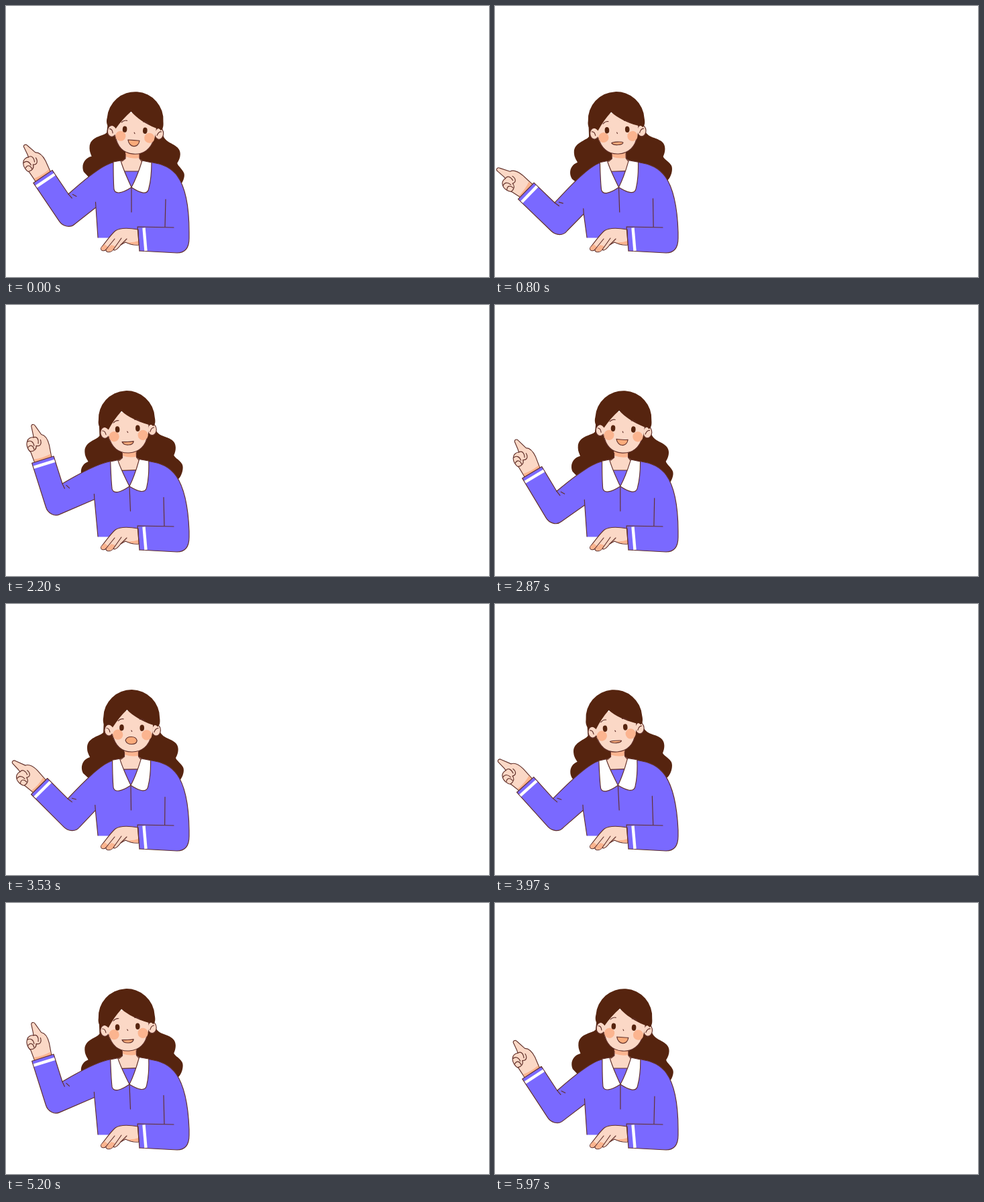
An HTML page for the animation above (6010 ms loop, 720 px wide and 405 px high).

```html
<!DOCTYPE html>
<html lang="en">
<head>
<meta charset="utf-8">
<title>Pointing presenter</title>
<style>
  html, body { margin: 0; width: 100%; height: 100%; overflow: hidden; background: #fff; }
  svg { display: block; width: 100vw; height: 100vh; }
  .hair { fill: #56240f; }
  .skin { fill: #fbd8c6; }
  .blush { fill: #fbb48f; }
  .cloth { fill: #7a69ff; }
  .white { fill: #fff; }
  .line { stroke: #61302a; stroke-width: 1.15; stroke-linecap: round; stroke-linejoin: round; }
  .open { fill: none; }
  .stripe { fill: none; stroke: #fff; stroke-width: 4.4; }
</style>
</head>
<body>
<svg viewBox="0 0 720 405">
  <g id="backHair">
    <path class="hair" d="M-40-80L-41-58C-46-52-66-51-65-34C-65-28-62-24-61-21C-72-18-76-6-71 3L-58 15L68 18C76 14 81 0 78-6C75-12 68-16 67-20C71-27 73-37 66-43C58-50 48-49 43-60L40-80Z"/>
  </g>

  <g id="hand">
    <path class="skin line" d="M-30-40V-60C-33-64-33-73-29-77C-27-80-22-81-18.500-79L-17.500-83L-15.800-95C-15.500-98.500-10.500-98.500-10-94L-6-79C-1-76 .5-69-.5-60L-4-40Z"/>
    <path class="blush" d="M-29.400-40V-48Q-16-45-3.300-47L-4.500-40Z"/>
    <path class="line open" d="M-29-76C-24-77-21-73-22-67M-18.500-79C-13-79-12-74-15-68M-31-68C-26-71-23-67-24-62M-30-61C-25-59-20-61-19-66C-14-62-10-66-10-72"/>
  </g>

  <path id="body" class="cloth"/>
  <path id="outline" class="line open"/>
  <g id="forearm">
    <path class="stripe" d="M-33.400-36H-.6"/>
    <path class="line open" d="M0 0L1 8M5 4L8 9.500"/>
  </g>

  <g id="chest">
    <path class="skin" d="M-9-58V-43L-17-38L-10-24H11L18-38L12-43V-58Z"/>
    <path class="blush" d="M-9-52H12V-44Q2-42-9-46Z"/>
    <path class="line open" d="M-9-50V-43L-14-39M12-50V-43L15-39M-10-24H11"/>
    <path class="white line" d="M-16-40L-27-38C-27-20-27-8-26 3C-24 11-14 9 0 0C-6-13-12-26-16-40Z"/>
    <path class="white line" d="M16-40L30-37C30-20 28-6 25.500 3C23 12 12 8 0 0C7-13 12-27 16-40Z"/>
  </g>

  <path class="skin line" d="M197 334C185 332 170 331 163 336C157 341 150 351 142 361C140 366 146 367 149 364C149 369 156 369 160 364C163 367 168 361 171 357L178 353C184 356 190 358 198 357Z"/>
  <path class="blush" d="M147 356L142 361C141 366 146 366 149 363C150 368 156 368 160 364L163 359L157 357L153 361Z"/>
  <path class="blush" d="M180 353Q189 354 197.500 351V356.500Q188 357 180 353Z"/>
  <path class="line open" d="M162 348L149 364M172 347L160 364M180 348L171 357"/>
  <path class="stripe" d="M205.500 331.500L208.500 366"/>
  <path class="line open" d="M250 331L196 330L199 366"/>

  <g id="head">
    <g class="skin line">
      <ellipse cx="-33.500" cy="-61" rx="6.500" ry="8.500"/>
      <ellipse cx="37" cy="-62" rx="6.500" ry="8.500"/>
    </g>
    <path class="line open" d="M-37-64Q-33-64-32-58M40-65Q36-65 34-59"/>
    <path class="skin" d="M-30-90V-66C-29-42-16-29 1-29C18-29 31-42 32-66V-90Z"/>
    <path class="line open" d="M-28-55C-24-37-13-29 1-29C16-29 27-38 30-55"/>
    <path class="hair" d="M-39-67C-42-70-43-75-42-80A42 42 0 0 1 42-80C43-73 42-69 39-67C36-71 34-69 31-70C16-75 2-83-7-92C-15-84-22-75-28-65C-31-69-35-71-39-67Z"/>
    <g class="blush">
      <circle cx="-20" cy="-54.500" r="7.600"/>
      <circle cx="23" cy="-54.500" r="7.600"/>
    </g>
    <path class="line open" d="M-20-75Q-16-79-12-78M12-78Q17-79 20-75M0-61L.8-59.500"/>
    <g class="hair">
      <ellipse id="eyeL" cx="-14.500"/>
      <ellipse id="eyeR" cx="15.800"/>
    </g>
    <path id="mouth" class="line" fill="#f9ab7b"/>
  </g>
</svg>
<script>
const PERIOD = 3005;
const TIMES = [0, 530, 800, 1400, 2200];
// collar x, head tilt, elbow x, elbow y, forearm lean, wrist bend, mouth y, upper lip, lower lip
const POSES = [
  [187, 4, 93, 281, 34, 0, -49.5, 0, 9],
  [186, .8, 92, 291, 45, 6, -46, -5.5, 5.5],
  [184.5, -2.7, 89, 294, 46, 11, -45.5, -1.5, 3],
  [181, -7, 81, 279, 29.5, 4, -45, .6, 3.6],
  [184, -3, 84, 267, 17.5, 3, -46, .4, 5]
];

const $ = id => document.getElementById(id);
const set = (id, name, value) => $(id).setAttribute(name, value);
const place = (id, x, y, angle) => set(id, 'transform', `translate(${x} ${y}) rotate(${angle})`);

// Key at any index, continued periodically
function key(i) {
  const n = TIMES.length, lap = Math.floor(i / n), k = i - lap * n;
  return { t: TIMES[k] + lap * PERIOD, v: POSES[k] };
}

// Smooth cubic through the keys
function poseAt(t) {
  let i = TIMES.length - 1;
  while (TIMES[i] > t) i--;
  const [a, b, c, d] = [-1, 0, 1, 2].map(k => key(i + k));
  const h = c.t - b.t, s = (t - b.t) / h, r = 1 - s;
  return b.v.map((p, j) => {
    const q = c.v[j];
    const m = (q - a.v[j]) / (c.t - a.t) * h;
    const n = (d.v[j] - p) / (d.t - b.t) * h;
    return (1 + 2 * s) * r * r * p + s * r * r * m + s * s * (3 - 2 * s) * q - s * s * r * n;
  });
}

function draw(t) {
  const [v, tilt, ex, ey, lean, bend, my, up, low] = poseAt(t);
  const sway = v - 187;
  const a = lean * Math.PI / 180, cos = Math.cos(a), sin = Math.sin(a);
  const arm = (x, y) => `${ex + x * cos + y * sin} ${ey - x * sin + y * cos} `;

  // The curls swing wider than the head and trail behind its lean
  const trail = Math.min(tilt, 0) ** 2 * .125;
  place('backHair', v + trail, 250, 1.25 * tilt - 1);
  place('head', v, 250, tilt);
  place('chest', v, 271, sway * .65);
  place('forearm', ex, ey, -lean);
  set('hand', 'transform',
    `translate(${ex} ${ey}) rotate(${-lean}) rotate(${-bend} -17 -45)`);

  const ax = 134 + sway * .7, ay = 301 + (ey - 281) * .75;
  const sleeve = `M${v - 20} 233C${v - 36} 232 ${ex + .55 * (v - 35 - ex)} ${ey + .55 * (228 - ey)} ${ex} ${ey}
    L${arm(0, -43)}L${arm(-34, -43)}L${arm(-34, 26)}
    C${arm(-34, 35)}${arm(-27, 44)}${arm(-17, 42.5)}L${ax} ${ay}`;
  const side = `M${v + 25} 233C${v + 53} 237 ${273 + sway * 1.2} 242 273 338
    V347C273 362 267 369 255 369L199 366`;
  set('body', 'd', `${sleeve}L137 346.500H197L199 366L${v + 25} 233Z${side}Z`);
  set('outline', 'd', `${sleeve}M${ax - .5} ${ay - 8}L${ax} ${ay}L137 346${side}
    M${v} 271L${187 + sway * .5} 308M${238 + sway} ${289 + sway * .5}L${237 + sway * .35} 330`);

  const shut = Math.max(0, 1 - Math.abs(t - 1410) / 150);
  const lid = Math.min(1, shut * 1.25);
  for (const id of ['eyeL', 'eyeR']) {
    set(id, 'cy', -65 + 3.6 * lid);
    set(id, 'rx', 3.3 + .4 * lid);
    set(id, 'ry', 4.7 - 3.4 * lid);
  }
  const w = 8.6, lip = y => my + y / .75;
  set('mouth', 'd', `M${-w} ${my}C${-w * .8} ${lip(up)} ${w * .8} ${lip(up)} ${w} ${my}
    C${w * .9} ${lip(low)} ${-w * .7} ${lip(low)} ${-w} ${my}Z`);
}

const start = performance.now();
function frame() {
  draw((performance.now() - start) % PERIOD);
  requestAnimationFrame(frame);
}
frame();
</script>
</body>
</html>
```
